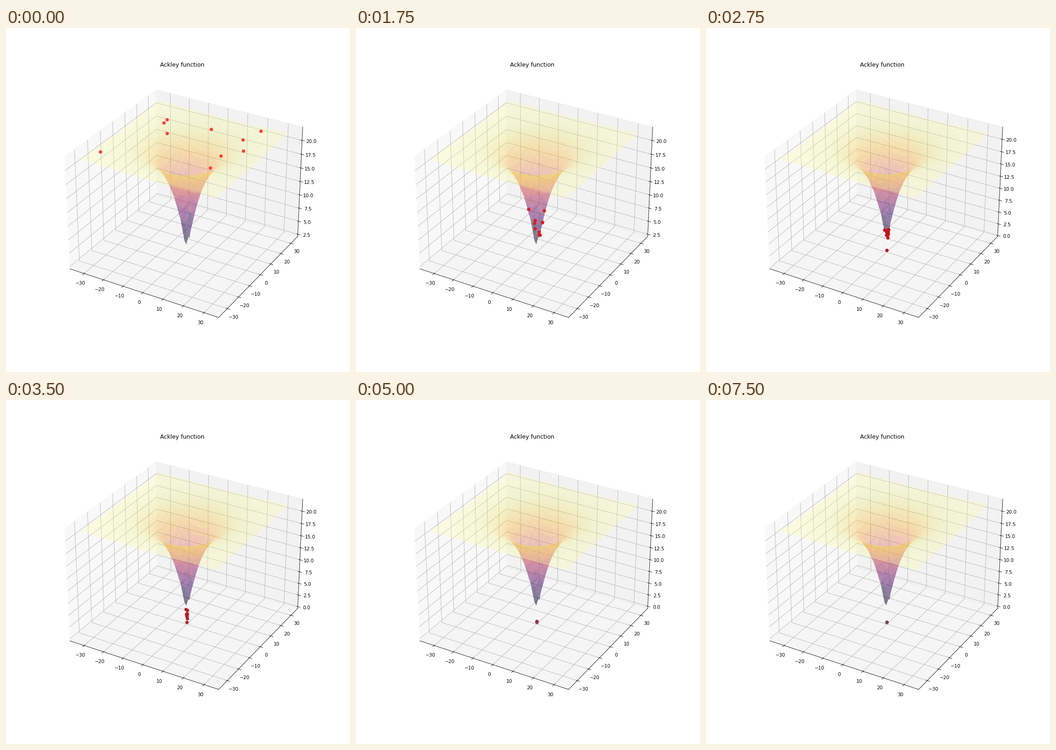
Recreate the animation shown at these times as a matplotlib script. Size 748 by 748 pixels, loop 8000 ms.

```python
import numpy as np
import matplotlib.pyplot as plt
from matplotlib.animation import FuncAnimation

SIZE, INCHES = 748, 10
FRAMES, INTERVAL = 32, 250
SURFACE_LOW, TOP = 2.5, 22.0
PULL = 0.33            # rate at which the swarm closes in per step
LEADER, LEAD_STEP = 6, 11

STARTS = 0.5 + np.array([(-28, -26), (-20, 13), (-20, 16), (-16, 9), (0, 20),
                         (12, 7), (14, -6), (18, 16), (23, 7), (22, 25)])
FRESH, CLOSE, SETTLED = np.array([(255, 59, 48), (205, 16, 22),
                                  (125, 72, 78)]) / 255


def ackley(x, y):
    rms = np.sqrt((x**2 + y**2) / 2)
    waves = (np.cos(2 * np.pi * x) + np.cos(2 * np.pi * y)) / 2
    return 20 - 20 * np.exp(-0.2 * rms) + np.e - np.exp(waves)


def padded(low, high, margin):
    pad = (high - low) * margin
    return low - pad, high + pad


def swarm(step):
    """Every point falls towards the minimum; the leader jumps ahead."""
    points = STARTS * np.exp(-PULL * step)
    if step >= LEAD_STEP:
        points[LEADER] *= 0.15
    x, y = points.T
    return x, y, ackley(x, y)


def dot_color(step):
    if step < 10:
        return FRESH + (CLOSE - FRESH) * step / 10
    return CLOSE + (SETTLED - CLOSE) * min((step - 10) / 13, 1)


fig = plt.figure(figsize=(INCHES, INCHES), dpi=SIZE / INCHES)
ax = fig.add_subplot(projection="3d")
ax.set_title("Ackley function")

axis = np.arange(-32.768, 32.768, 1)
X, Y = np.meshgrid(axis, axis)
ax.plot_surface(X, Y, ackley(X, Y), cmap="inferno", alpha=0.3, linewidth=0)
dots, = ax.plot([], [], [], "o", zorder=10)

limits = padded(*padded(axis[0], axis[-1], 0.05), 1 / 48)
ax.set_xlim(*limits)
ax.set_ylim(*limits)


def update(step):
    x, y, z = swarm(step)
    dots.set_data_3d(x, y, z)
    dots.set_color(dot_color(step))
    ax.set_zlim(*padded(min(SURFACE_LOW, z.min()), TOP, 1 / 48))
    return [dots]


anim = FuncAnimation(fig, update, frames=FRAMES, interval=INTERVAL,
                     init_func=lambda: update(0), repeat=True, repeat_delay=0)
plt.show()
```
